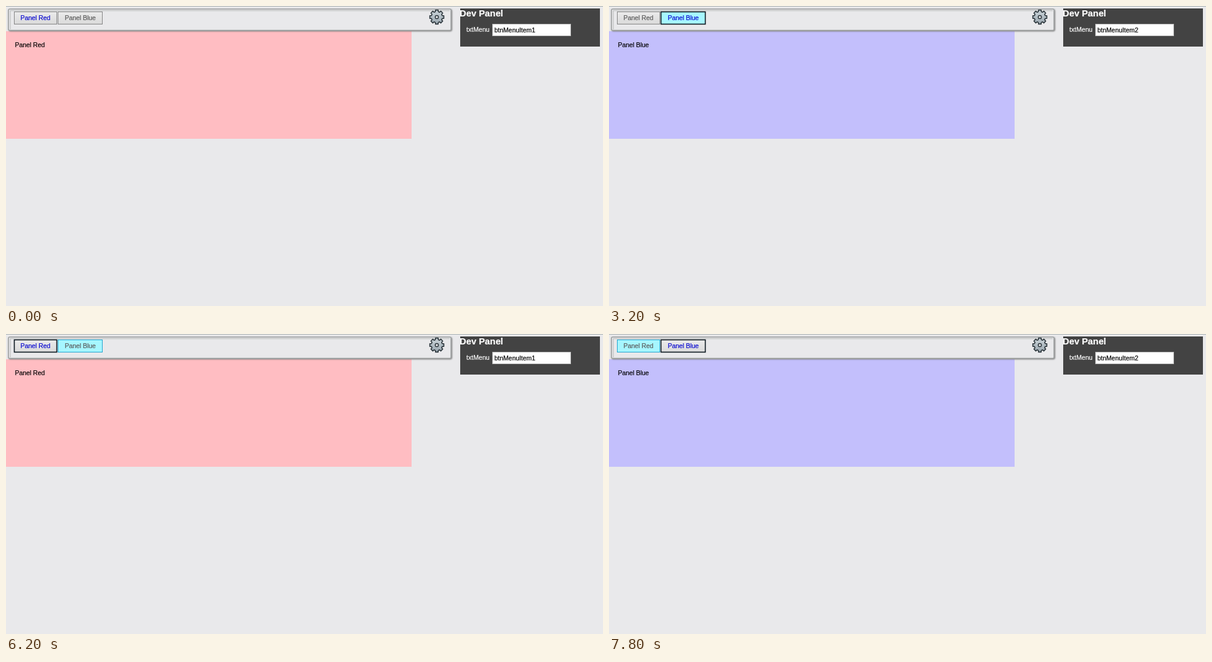
Animation, 970 px wide and 488 px high, one loop 8 s. Source, as an HTML page:

```html
<!DOCTYPE html>
<html>
<head>
<meta charset="utf-8">
<style>
  html, body { margin: 0; width: 100%; height: 100%; overflow: hidden; background: #e9e9eb; }
  svg { display: block; width: 970px; height: 488px; font: 10.4px "Liberation Sans", Arial, sans-serif; }
  text { stroke-width: .2px; stroke: currentColor; fill: currentColor; }
  .bar { filter: drop-shadow(1px 1px 1px #777); }
  .btn { color: #595959; }
  .btn rect { fill: url(#face); stroke: #858585; }
  .on { color: #0606d0; }
  .hover rect { fill: #a6f6ff; stroke: #23a6d0; }
  .focus rect { stroke: #0c1820; stroke-width: 1.6px; }
  .press rect { fill: #33b5e5; }
  .press text { transform: translate(1px, 1px); }
</style>
</head>
<body>
<svg viewBox="0 0 970 488">
  <defs>
    <linearGradient id="face" x2="0" y2="1">
      <stop stop-color="#ebebeb"/><stop offset="1" stop-color="#dadada"/>
    </linearGradient>
    <linearGradient id="steel" x2="0" y2="1">
      <stop stop-color="#ccd5da"/><stop offset="1" stop-color="#98a5ae"/>
    </linearGradient>
  </defs>
  <path d="M0 .5H970" stroke="#a9b1b1"/>
  <rect id="panel" y="41" width="659" height="175"/>
  <text id="caption" x="14.5" y="67"/>

  <g class="bar" fill="none">
    <rect x="4" y="5" width="719" height="34.5" rx="2" fill="#e9e9eb" stroke="#a0a3a3" stroke-width="1.6"/>
  </g>
  <path d="M7 38V7.5H721" fill="none" stroke="#c3c5c5" stroke-width="1.4"/>

  <g class="btn" id="red">
    <rect x="13.5" y="9.5" width="69" height="20"/><text x="23.5" y="23">Panel Red</text>
  </g>
  <g class="btn" id="blue">
    <rect x="84.5" y="9.5" width="72" height="20"/><text x="95.5" y="23">Panel Blue</text>
  </g>

  <g transform="translate(700 18)" stroke="#2d373d" stroke-width="1.6" stroke-linejoin="round">
    <path id="gear" fill="url(#steel)"/>
    <circle r="2.6" fill="#e9e9eb" stroke-width="1.5"/>
  </g>

  <rect x="738" y="4" width="227" height="62" fill="#434343"/>
  <g color="#fff">
    <text x="737" y="17" font-size="14.8" font-weight="bold" stroke="none">Dev Panel</text>
    <text x="748" y="42" font-size="10.6">txtMenu</text>
  </g>
  <rect x="790.5" y="29.5" width="127" height="19" fill="#fff" stroke="#b4b4b4"/>
  <text id="field" x="793.5" y="43"/>
</svg>
<script>
const $ = id => document.getElementById(id);

// start time, open panel, hovered, focused and pressed button
const steps = [
  [0, 'red'],
  [1600, 'red', 'red'],
  [2000, 'red', 'blue'],
  [3200, 'blue', 'blue', 'blue'],
  [3600, 'blue', 'red', 'blue'],
  [4800, 'blue', 'red', 'red', 'red'],
  [5200, 'red', 'red', 'red'],
  [6000, 'red', 'blue', 'red'],
  [7200, 'red', 'blue', 'blue', 'blue'],
  [7400, 'blue', 'blue', 'blue'],
  [7600, 'blue', 'red', 'blue']
];

function drawGear() {
  const points = [];
  for (let i = 0; i < 8; i++) {
    for (const [turn, r] of [[-.27, 9], [-.19, 11.6], [.19, 11.6], [.27, 9]]) {
      const a = i * Math.PI / 4 + turn;
      points.push((r * Math.cos(a)).toFixed(2) + ' ' + (r * Math.sin(a)).toFixed(2));
    }
  }
  $('gear').setAttribute('d', 'M' + points.join('L') + 'Z');
}

let shown;
function show(step) {
  if (step === shown) return;
  shown = step;
  const [, open, hover, focus, press] = step;
  for (const id of ['red', 'blue']) {
    const list = $(id).classList;
    list.toggle('on', id === open);
    list.toggle('hover', id === hover);
    list.toggle('focus', id === focus);
    list.toggle('press', id === press);
  }
  const isRed = open === 'red';
  $('panel').setAttribute('fill', isRed ? '#ffbdc2' : '#c3bffc');
  $('caption').textContent = isRed ? 'Panel Red' : 'Panel Blue';
  $('field').textContent = 'btnMenuItem' + (isRed ? 1 : 2);
}

function frame() {
  const t = performance.now() % 8000;
  show(steps.findLast(s => s[0] <= t));
  requestAnimationFrame(frame);
}

drawGear();
frame();
</script>
</body>
</html>
```
